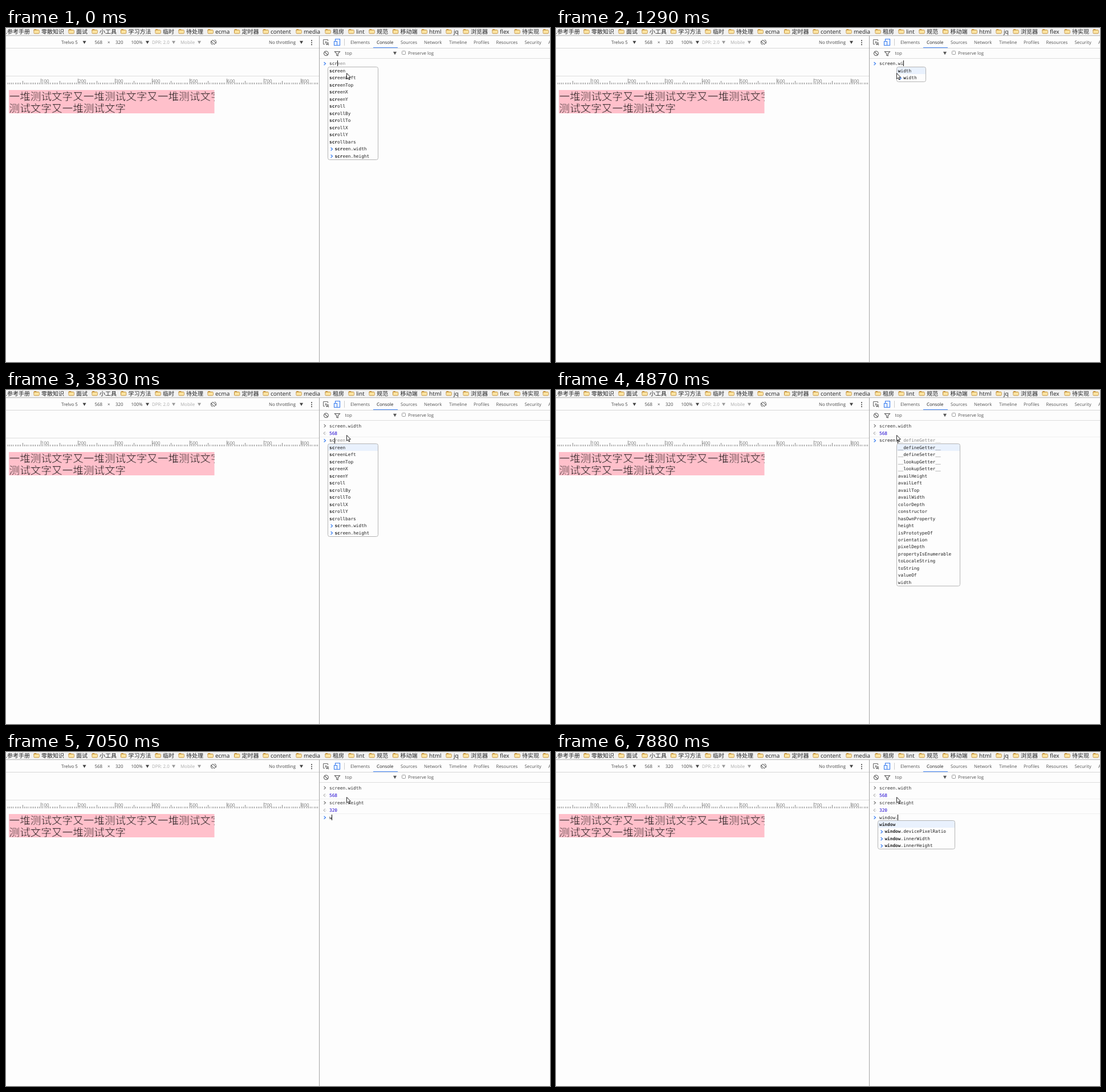
These frames come from a looping animation (954 by 587 pixels, 8 s). An HTML page with a canvas:

```html
<!DOCTYPE html>
<html lang="zh">
<head>
<meta charset="utf-8">
<title>Console session</title>
<style>
html, body { margin: 0; width: 100%; height: 100%; overflow: hidden; background: #fdfdfd; }
canvas { display: block; }
</style>
</head>
<body>
<canvas id="stage" width="954" height="587"></canvas>
<script>
const ctx = document.getElementById('stage').getContext('2d');
ctx.textRendering = 'geometricPrecision';

const LOOP = 8000;
const UI = '7.9px "Open Sans", "Noto Sans", sans-serif';
const MONO = '7.78px "DejaVu Sans Mono", monospace';
const BOOKMARK = '10px "Open Sans", "Noto Sans CJK SC", sans-serif';
const PAGE = '300 18.6px "Noto Sans CJK SC", serif';
const BLUE = '#367cf1', PINK = '#ffc0cb', PAPER = '#fdfdfd';
const CHAR = 4.684, LEFT = 567, ROW = 26.3, ITEM = 12.47;

const words = s => s.split(' ');
const globals = words(
  'screen screenLeft screenTop screenX screenY scroll scrollBy scrollTo scrollX scrollY scrollbars ' +
  'self sessionStorage setInterval setTimeout speechSynthesis status statusbar stop styleMedia super switch ' +
  'webkitAudioContext webkitCancelAnimationFrame webkitCancelRequestAnimationFrame webkitIDBCursor ' +
  'webkitIDBDatabase webkitIDBFactory webkitIDBIndex webkitIDBKeyRange webkitIDBObjectStore webkitIDBRequest ' +
  'webkitIDBTransaction webkitIndexedDB webkitMediaStream webkitOfflineAudioContext webkitRTCPeerConnection ' +
  'webkitRequestAnimationFrame webkitRequestFileSystem webkitResolveLocalFileSystemURL webkitSpeechGrammar ' +
  'webkitSpeechGrammarList webkitSpeechRecognition webkitSpeechRecognitionError webkitSpeechRecognitionEvent ' +
  'webkitStorageInfo webkitURL while window with');
const members = words(
  '__defineGetter__ __defineSetter__ __lookupGetter__ __lookupSetter__ availHeight availLeft availTop ' +
  'availWidth colorDepth constructor hasOwnProperty height isPrototypeOf orientation pixelDepth ' +
  'propertyIsEnumerable toLocaleString toString valueOf width');
const past = words('screen.width screen.height window.devicePixelRatio window.innerWidth window.innerHeight');
const log = [['screen.width', '568'], ['screen.height', '320']];

// start time, finished log entries, typed text, completion query, caret hidden
const states = [
  [0, 0, 'scr', 'scr'],
  [120, 0, 'scre', 'scr'],
  [245, 0, 'scre', 'scre'],
  [370, 0, 'scree', 'scree'],
  [520, 0, 'screen', 'screen'],
  [1020, 0, 'screen', 'screen', true],
  [1160, 0, 'screen.', 'screen.'],
  [1290, 0, 'screen.wi', 'screen.w'],
  [1430, 0, 'screen.wid', 'screen.wid'],
  [1570, 0, 'screen.widt', 'screen.widt'],
  [1700, 0, 'screen.width', 'screen.width'],
  [2200, 0, 'screen.width', 'screen.width', true],
  [2760, 1, '', ''],
  [3270, 1, '', '', true],
  [3550, 1, 's', 's'],
  [3830, 1, 'sc', 'sc'],
  [4230, 1, 'screen', ''],
  [4740, 1, 'screen', '', true],
  [4870, 1, 'screen.', 'screen.'],
  [5120, 1, 'screen.h', 'screen.h'],
  [5245, 1, 'screen.he', 'screen.he'],
  [5370, 1, 'screen.heig', 'screen.heig'],
  [5510, 1, 'screen.heigh', 'screen.heigh'],
  [5640, 1, 'screen.height', 'screen.height'],
  [6150, 2, '', ''],
  [6610, 2, '', '', true],
  [7050, 2, 'w', ''],
  [7180, 2, 'w', 'w'],
  [7310, 2, 'wi', 'wi'],
  [7460, 2, 'win', 'win'],
  [7610, 2, 'wind', 'wind'],
  [7740, 2, 'window', 'window'],
  [7880, 2, 'window.', 'window']
];

function rect(x, y, w, h, color) {
  ctx.fillStyle = color;
  ctx.fillRect(x, y, w, h);
}

function text(s, x, y, font, color) {
  ctx.font = font;
  ctx.fillStyle = color;
  ctx.fillText(s, x, y);
}

// Shaves the glyph edges with the background colour to get a lighter weight.
function thinText(s, x, y, font, color, back) {
  text(s, x, y, font, color);
  ctx.strokeStyle = back;
  ctx.lineWidth = .55;
  ctx.lineJoin = 'round';
  ctx.strokeText(s, x, y);
  ctx.lineJoin = 'miter';
}

function line(points, color, width = 1, close = false) {
  ctx.beginPath();
  for (let i = 0; i < points.length; i += 2) ctx.lineTo(points[i], points[i + 1]);
  if (close) ctx.closePath();
  ctx.strokeStyle = color;
  ctx.lineWidth = width;
  ctx.stroke();
}

function ring(x, y, r, color, from = 0, to = 7) {
  ctx.beginPath();
  ctx.arc(x, y, r, from, to);
  ctx.strokeStyle = color;
  ctx.lineWidth = 1.1;
  ctx.stroke();
}

function arrow(x, y, color) {
  ctx.beginPath();
  ctx.moveTo(x - 3, y - 2.6);
  ctx.lineTo(x + 3, y - 2.6);
  ctx.lineTo(x, y + 2.8);
  ctx.fillStyle = color;
  ctx.fill();
}

function chevron(x, y, color, dir = 1) {
  line([x - 1.4 * dir, y - 2.6, x + 1.5 * dir, y, x - 1.4 * dir, y + 2.6], color, 1.2);
}

function folder(x) {
  ctx.beginPath();
  ctx.roundRect(x + .5, 2.5, 4.5, 3, 1);
  ctx.roundRect(x + .5, 3.5, 9.2, 6.2, 1);
  ctx.strokeStyle = '#c08a2e';
  ctx.lineWidth = 1;
  ctx.stroke();
  rect(x + 1, 4, 8.2, 5.2, '#fbe3a0');
}

function bookmarks() {
  rect(0, 0, 954, 13, '#f2f2f2');
  rect(0, 13, 954, 1, '#b8b8b8');
  text('.', -1, 10, BOOKMARK, '#222');
  const items = [['参考手册', 2], ['零散知识', 62], ['面试', 123], ['小工具', 164], ['学习方法', 214.5], ['临时', 275],
    ['待处理', 316], ['ecma', 367], ['定时器', 413.5], ['content', 464], ['media', 522], ['租房', 573], ['lint', 614],
    ['规范', 650], ['移动端', 691.5], ['html', 742], ['jq', 785], ['浏览器', 815], ['flex', 866], ['待实现', 905], ['', 955]];
  for (const [name, x] of items) {
    if (x > 9) folder(x - 13.5);
    text(name, x, 10, BOOKMARK, '#222');
  }
}

function deviceBar() {
  const dark = '#444', pale = '#aaa';
  const labels = [['Trelvo 5', 97], ['568', 155.5], ['×', 178], ['320', 192], ['100%', 219.5], ['No throttling', 461]];
  for (const [s, x] of labels) text(s, x, 28.3, UI, dark);
  text('DPR: 2.0', 256, 28.3, UI, pale);
  text('Mobile', 306, 28.3, UI, pale);
  for (const x of [137.5, 248, 518]) arrow(x, 25.3, dark);
  for (const x of [294, 339]) arrow(x, 25.3, '#999');
  ctx.save();
  ctx.translate(364, 25);
  ctx.rotate(-Math.PI / 4);
  ctx.beginPath();
  ctx.roundRect(-1.9, -3.6, 3.8, 7.2, .8);
  ctx.strokeStyle = '#666';
  ctx.lineWidth = 1;
  ctx.stroke();
  ctx.restore();
  ring(364, 25, 4.6, '#666', -1.2, .5);
  ring(364, 25, 4.6, '#666', 1.9, 3.7);
  for (const y of [21, 24.6, 28.2]) rect(535, y, 2, 2, '#666');
  rect(0, 35, 549, 1, '#d6d6d6');
}

function ruler() {
  rect(0, 84, 549, 1, '#dcdcdc');
  for (let n = 10; n < 850; n += 5) {
    const x = Math.round(n * .651 - 4);
    const h = n % 100 === 0 ? 10 : n % 50 === 0 ? 6 : 3;
    rect(x, 99 - h, 1, h, '#8a8a8a');
    if (n % 100 === 0) text(n, x + 1, 96, UI, '#777');
  }
}

function page() {
  const phrase = '一堆测试文字', both = phrase + '又' + phrase;
  ctx.save();
  ctx.beginPath();
  ctx.rect(5, 109, 360.5, 41);
  ctx.clip();
  rect(5, 109, 361, 41, PINK);
  thinText(both + '又' + phrase, 5.6, 126.5, PAGE, '#111', PINK);
  thinText(both.slice(2), 5.6, 147.5, PAGE, '#111', PINK);
  ctx.restore();
}

function panelBars() {
  rect(549, 14, 1, 573, '#a6a6a6');
  rect(550, 35, 404, 1, '#d6d6d6');
  rect(550, 53, 404, 1, '#dedede');
  const tabs = [['Elements', 604], ['Console', 650], ['Sources', 692], ['Network', 733], ['Timeline', 777],
    ['Profiles', 820], ['Resources', 859.5], ['Security', 909.5], ['Audits', 951]];
  for (const [s, x] of tabs) text(s, x, 27.9, UI, s === 'Console' ? '#222' : '#555');
  rect(644, 34, 43, 1, '#4285f4');
  // inspect and device mode buttons
  line([559, 28.5, 556.5, 28.5, 556.5, 20.5, 564.5, 20.5, 564.5, 23], '#666');
  line([560, 24, 566, 26.5, 563.4, 27.4, 562.5, 30, 560, 24], '#555', 1);
  line([563.5, 27.5, 566, 30], '#555', 1.2);
  line([577.5, 23, 577.5, 19.5, 585.5, 19.5, 585.5, 30.5, 581, 30.5], BLUE, 1.1);
  line([575.5, 23.5, 580.5, 23.5, 580.5, 30.5, 575.5, 30.5], BLUE, 1.1, true);
  rect(593, 19, 1, 12, '#ccc');
  // console controls
  ring(561.4, 44.6, 3.9, '#555');
  line([558.7, 41.9, 564.1, 47.3], '#555', 1.1);
  line([576.5, 41.5, 585.5, 41.5, 582.2, 45.2, 582.2, 48.8, 579.8, 48, 579.8, 45.2], '#555', 1.1, true);
  text('top', 594.5, 47.3, UI, '#555');
  arrow(682, 44.4, '#555');
  ctx.beginPath();
  ctx.roundRect(694.5, 40.5, 6, 6, 1);
  ctx.strokeStyle = '#999';
  ctx.lineWidth = 1;
  ctx.stroke();
  text('Preserve log', 705, 47.3, UI, '#555');
}

function complete(query) {
  const dot = query.lastIndexOf('.') + 1;
  const word = query.slice(dot);
  const items = (dot ? members : globals).filter(s => s.startsWith(word)).map(s => ({ s, old: false }));
  if (word) {
    for (const s of past) if (s.startsWith(query)) items.push({ s: s.slice(dot), old: true });
  }
  return { dot, word, items };
}

function popup({ dot, word, items }, row, marked) {
  const x = LEFT + dot * CHAR, left = Math.round(x - 3) + .5;
  const top = Math.round(67.8 + row * ROW) + .5;
  const span = Math.max(...items.map(i => i.s.length * CHAR + (i.old ? 9.4 : 0)));
  const w = Math.round(x + span + 15.5 - left), h = Math.round(items.length * ITEM + .6);
  ctx.beginPath();
  ctx.roundRect(left, top, w, h, 3);
  ctx.fillStyle = PAPER;
  ctx.fill();
  if (marked) rect(left + .5, top + .5, w - 1, 12, '#e9f1fd');
  ctx.strokeStyle = '#b4b4b4';
  ctx.lineWidth = 1;
  ctx.stroke();
  items.forEach(({ s, old }, i) => {
    const y = top + 9.4 + i * ITEM, tx = x + (old ? 9.4 : 0);
    if (old) chevron(x + 4, y - 2.2, BLUE);
    text(word, tx, y, 'bold ' + MONO, '#222');
    text(s.slice(word.length), tx + word.length * CHAR, y, MONO, '#222');
  });
}

function pointer() {
  ctx.beginPath();
  const p = [597.5, 79.5, 597.5, 89.5, 599.8, 87.4, 601.4, 91, 603, 90.3, 601.4, 86.9, 604.4, 86.6];
  for (let i = 0; i < p.length; i += 2) ctx.lineTo(p[i], p[i + 1]);
  ctx.closePath();
  ctx.fillStyle = '#fff';
  ctx.fill();
  ctx.strokeStyle = '#111';
  ctx.lineWidth = .9;
  ctx.stroke();
}

function consoleView(t) {
  const [start, row, typed, query, hidden] = states.findLast(s => s[0] <= t);
  for (let i = 0; i < row; i++) {
    const y = 65.7 + i * ROW;
    chevron(559, y - 2.7, '#777');
    text(log[i][0], LEFT, y, MONO, '#333');
    chevron(558.5, y + 10.4, '#bbb', -1);
    rect(560.5, y + 10, 1, 1, '#bbb');
    text(log[i][1], LEFT, y + 13, MONO, '#1c00cf');
    rect(550, Math.round(y + 16), 404, 1, '#f0f0f0');
  }
  const y = 65.1 + row * ROW, end = LEFT + typed.length * CHAR;
  chevron(559, y - 2.5, BLUE);
  text(typed, LEFT, y, MONO, '#222');
  if (query) {
    const list = complete(query);
    if (query === typed) text(list.items[0].s.slice(list.word.length), end, y, MONO, '#8c8c8c');
    popup(list, row, start > 0);
  }
  if (!hidden) rect(Math.floor(end - .05), Math.round(57.3 + row * ROW), 1, 10, '#111');
}

function draw(now) {
  rect(0, 0, 954, 587, PAPER);
  deviceBar();
  ruler();
  page();
  panelBars();
  bookmarks();
  consoleView(now % LOOP);
  pointer();
}

const begin = performance.now();
function tick() {
  draw(performance.now() - begin);
  requestAnimationFrame(tick);
}
tick();
</script>
</body>
</html>
```
